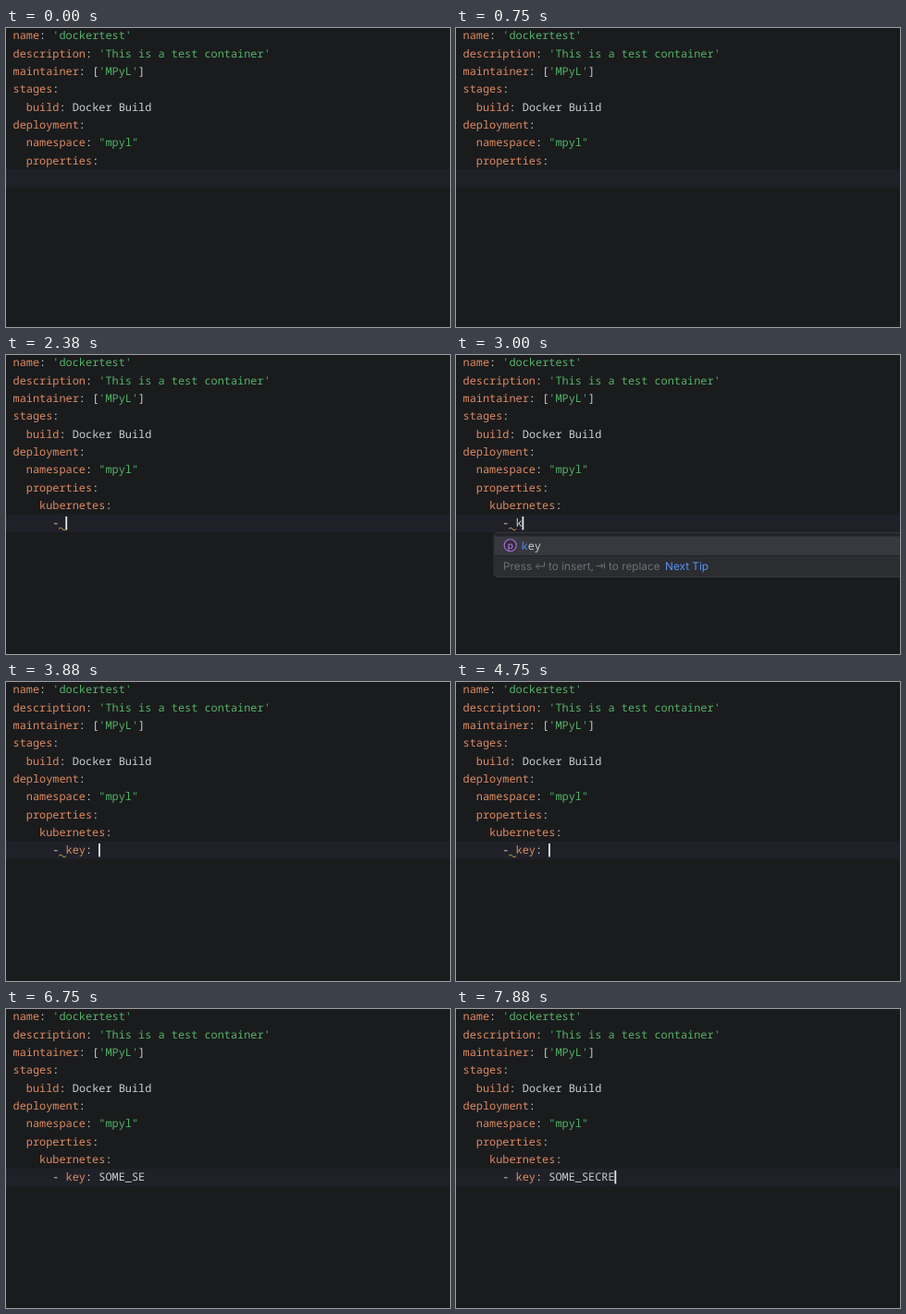
Write an HTML page that moves like this. It is 480 px wide and 324 px high and loops after 8 s.

```html
<!DOCTYPE html>
<html lang="en">
<head>
<meta charset="utf-8">
<title>YAML completion</title>
<style>
  html, body { margin: 0; width: 100%; height: 100%; overflow: hidden; background: #1a1b1d; }
  svg { display: block; width: 480px; height: 324px; }
  text { white-space: pre; fill: #cbcdd0; text-rendering: geometricPrecision; }
  .code { font: 11.9px "Noto Sans Mono", monospace; }
  .ui { font: 11.8px Inter, sans-serif; }
  .ui text { fill: #6c6f75; }
  .ui .link { fill: #5a92f5; }
  .key { fill: #dc8a62; }
  .str { fill: #53b267; }
  .hit { fill: #4d86ee; }
  .dim { fill: #777a80; }
  .panel { fill: #222428; stroke: #35373c; }
  .selected { fill: #37393f; }
  .footer { fill: #2b2d31; }
  .mark { fill: none; stroke: #6c6f75; }
</style>
</head>
<body>
<svg viewBox="0 0 480 324">
  <rect width="480" height="324" fill="#1a1b1d"/>
  <rect id="current" width="480" height="19.4" fill="#202128"/>
  <g id="lines" class="code"></g>
  <path id="warning" d="M57 188.5q2-3 4 0t4 0" fill="none" stroke="#c29b42"/>
  <rect id="caret" width="1.8" height="14.5" fill="#e4e5e8"/>

  <g id="popup1">
    <rect class="panel" x="13.5" y="173.5" width="490" height="68.5" rx="4"/>
    <rect class="selected" x="14" y="177.5" width="480" height="20"/>
    <path class="footer" d="M14 219H480V241.5H18Q14 241.5 14 237.5Z"/>
    <g class="code">
      <text x="42" y="191.3"><tspan class="hit">k</tspan>ubernetes</text>
      <text class="dim" x="154" y="191.3">Represents a source for the value of an EnvVar</text>
      <text x="42" y="212.3">jen<tspan class="hit">k</tspan>ins</text>
    </g>
    <path class="mark" d="M134 183.5l4 3.5-4 3.5M138 187h8"/>
    <g fill="none" stroke="#c3c5c9" stroke-width="1.2">
      <path id="brackets" d="M27 182.5h-3v9.5h3M32.5 182.5h3v9.5h-3"/>
      <use href="#brackets" y="21"/>
    </g>
    <g id="hint" class="ui">
      <text x="22" y="234.3">Press</text>
      <path class="mark" d="M66.5 226v4.5h-9M60.5 227.5l-3 3 3 3"/>
      <text x="71" y="234.3">to insert,</text>
      <path class="mark" d="M123 230h7M127.5 227.5l2.5 2.5-2.5 2.5M131.5 227v6"/>
      <text x="136" y="234.3">to replace</text>
      <text class="link" x="197" y="234.3">Next Tip</text>
    </g>
  </g>

  <g id="popup2">
    <rect class="panel" x="41" y="192.5" width="460" height="48" rx="4"/>
    <rect class="selected" x="41.5" y="196.5" width="450" height="20.5"/>
    <path class="footer" d="M41.5 218H480V240H45.5Q41.5 240 41.5 236Z"/>
    <circle cx="58.7" cy="206.3" r="6.5" fill="#352b42" stroke="#a673d8" stroke-width="1.1"/>
    <text x="58.7" y="209.5" text-anchor="middle" style="font: 10px Inter, sans-serif; fill: #b987e6">p</text>
    <text class="code" x="70.5" y="210.5"><tspan class="hit">k</tspan>ey</text>
    <use href="#hint" x="29" y="-1.5"/>
  </g>
</svg>
<script>
const LOOP = 8000, LEFT = 7.5, CHAR = 7.14, PITCH = 19.33, BASE = 12.3;
const $ = id => document.getElementById(id);

const head = [
  "name: 'dockertest'",
  "description: 'This is a test container'",
  "maintainer: ['MPyL']",
  "stages:",
  "  build: Docker Build",
  "deployment:",
  '  namespace: "mpyl"',
  "  properties:"
];

// time, text of the edited line
const edits = [
  [0, "    "], [1000, "    k"], [1630, "      "],
  [2000, "      -"], [2250, "      - "], [2880, "      - k"], [3750, "      - key: "],
  [5000, "S"], [5130, "SO"], [5250, "SOM"], [5500, "SOME"], [5750, "SOME_"],
  [6000, "SOME_S"], [6250, "SOME_SE"], [7000, "SOME_SEC"],
  [7250, "SOME_SECR"], [7750, "SOME_SECRE"]
].map(([t, s]) => [t, t < 5000 ? s : "      - key: " + s]);

const caretOff = [[0, 250], [750, 1000], [1500, 1630], [2750, 2880],
  [3500, 3750], [4250, 4750], [6750, 7000]];

const within = (t, a, b) => t >= a && t < b;
const show = (id, on) => $(id).setAttribute("visibility", on ? "visible" : "hidden");
const place = (id, x, y) => $(id).setAttribute("transform", `translate(${x} ${y})`);

function paint(el, line) {
  const tokens = line.matchAll(/('[^']*'|"[^"]*")|(\w+)(?=:)|\w+|[^\w'"]+/g);
  el.replaceChildren(...Array.from(tokens, ([token, str, key]) => {
    const span = document.createElementNS(el.namespaceURI, "tspan");
    span.textContent = token;
    if (str || key) span.setAttribute("class", str ? "str" : "key");
    return span;
  }));
}

const rows = Array.from({ length: 10 }, (_, i) => {
  const el = document.createElementNS("http://www.w3.org/2000/svg", "text");
  el.setAttribute("x", LEFT);
  el.setAttribute("y", BASE + i * PITCH);
  $("lines").append(el);
  if (head[i]) paint(el, head[i]);
  return el;
});

let last = -1;
function render(t) {
  const step = edits.findLastIndex(e => e[0] <= t);
  const line = edits[step][1];
  const row = t < 1630 ? 8 : 9;
  if (step !== last) {
    paint(rows[8], row === 8 ? line : "    kubernetes:");
    paint(rows[9], row === 9 ? line : "");
    place("current", 0, row * PITCH - 1.4);
    place("caret", LEFT + line.length * CHAR - 0.3, row * PITCH + 1);
    last = step;
  }
  show("caret", !caretOff.some(([a, b]) => within(t, a, b)));
  show("warning", within(t, 2250, 5250));
  show("popup1", within(t, 1130, 1630));
  show("popup2", within(t, 3000, 3750));
}

const start = performance.now();
function frame() {
  render((performance.now() - start) % LOOP);
  requestAnimationFrame(frame);
}
frame();
</script>
</body>
</html>
```
